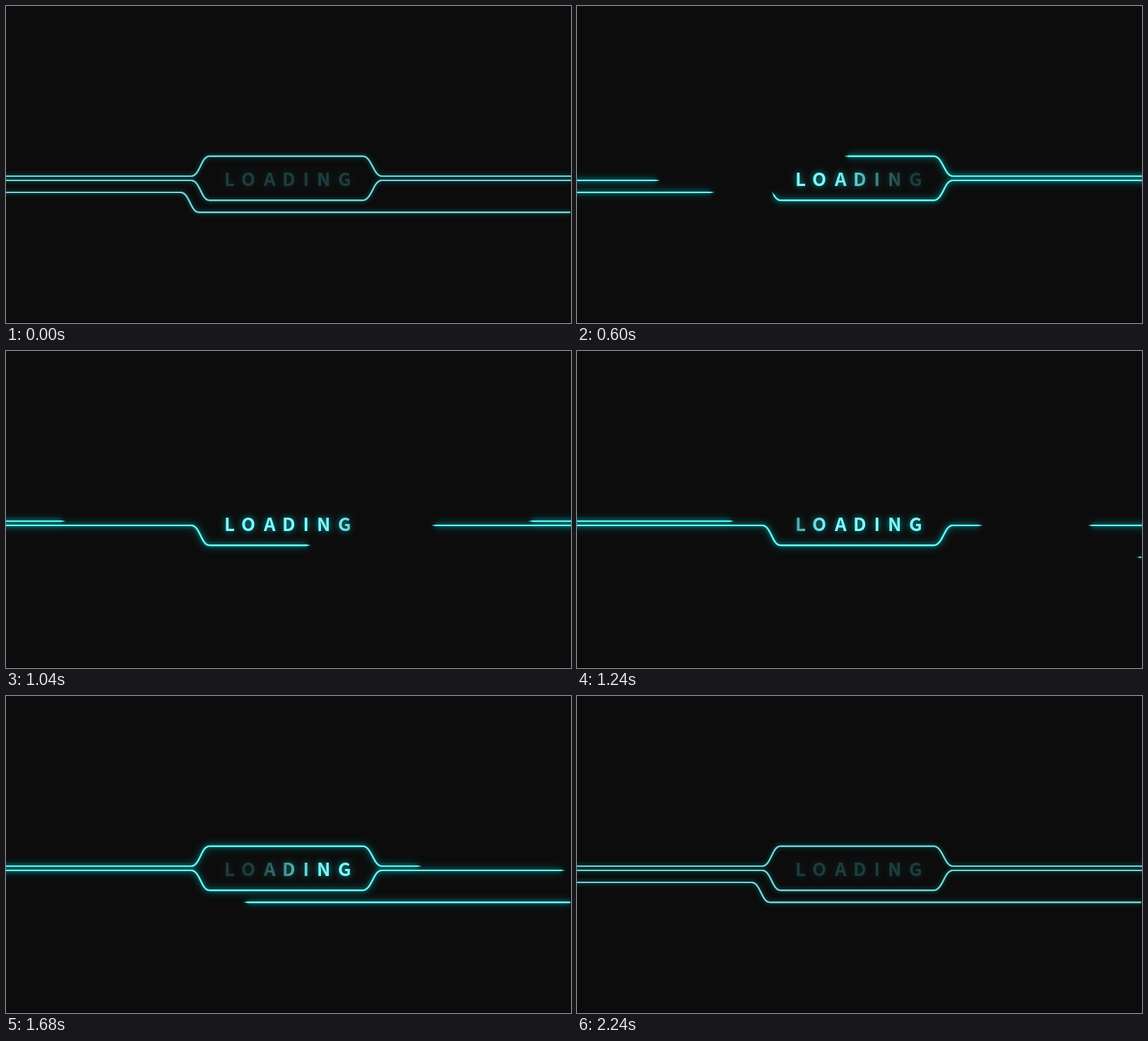
Animation of 800x449 px, one loop 2400 ms. Source, as an HTML page with a canvas:

```html
<!DOCTYPE html>
<html lang="en">
<head>
<meta charset="utf-8">
<title>Loading</title>
<style>
  html, body { margin: 0; height: 100%; overflow: hidden; background: #0c0c0c; }
  canvas { display: block; }
</style>
</head>
<body>
<canvas id="stage" width="800" height="449"></canvas>
<script>
const ctx = document.getElementById('stage').getContext('2d');
const LOOP = 2400, STEP = 40, END = 2240;
const PAD = 20; // how far the wires run on past the stage edges
const FAR = 9999;

const clamp = v => Math.max(0, Math.min(1, v));
const smooth = v => { v = clamp(v); return v * v * (3 - 2 * v); };
const ease = (t, start, length) => smooth((t - start) / length);
const mix = (a, b, k) => a + (b - a) * k;

// Piecewise linear value from [time, value] pairs
function track(keys, t) {
  const i = keys.findIndex(key => key[0] > t);
  if (i < 0) return keys[keys.length - 1][1];
  if (i === 0) return keys[0][1];
  const [t0, v0] = keys[i - 1], [t1, v1] = keys[i];
  return mix(v0, v1, (t - t0) / (t1 - t0));
}

const bend = (x0, y0, x1, y1) =>
  `L${x0} ${y0}C${x0 + 13} ${y0} ${x1 - 12} ${y1} ${x1} ${y1}`;
const hexSide = (outer, inner) => new Path2D(
  `M${-PAD} ${outer}${bend(262, outer, 288, inner)}${bend(505, inner, 532, outer)}L${800 + PAD} ${outer}`);

const LONG = 826, SHORT = 812;
const wires = [
  { path: hexSide(241, 212.7), length: LONG,
    gap: t => [940 * ease(t, 760, 1520), LONG * ease(t, 0, 1240)] },
  { path: hexSide(247, 275.2), length: LONG,
    gap: t => [LONG * ease(t, 240, 1520), LONG * ease(t, 0, 1520)] },
  { path: new Path2D(`M${-PAD} 264${bend(247, 264, 273, 292.2)}L799 292.2`), length: SHORT,
    gap: t => [SHORT * (1 - ease(t, 0, 880)), SHORT * (1 - ease(t, 1200, 880))] }
];

function glow(color, blur) {
  ctx.shadowColor = color;
  ctx.shadowBlur = blur;
}

// Strokes one stretch of a wire; open ends taper to a point
function stretch(path, from, to, openStart, openEnd, power) {
  const layer = (width, inset) => {
    const a = from + PAD + (openStart ? inset : 0);
    const b = to + PAD - (openEnd ? inset : 0);
    if (b <= a) return;
    ctx.lineWidth = width;
    ctx.setLineDash([b - a, FAR]);
    ctx.lineDashOffset = -a;
    ctx.stroke(path);
  };
  glow(`rgba(0,225,230,${mix(0.5, 0.95, power)})`, mix(7, 12, power));
  layer(2, 5);
  glow(`rgba(0,225,230,${mix(0.2, 0.8, power)})`, 5);
  layer(2, 5);
  glow('transparent', 0);
  for (let i = 0; i < 3; i++) layer(0.5 + i * 0.5, i * 2);
}

function drawWire({ path, length, gap }, t, power) {
  const [from, to] = gap(t);
  if (from >= length || to <= 0) {
    stretch(path, -PAD, length + PAD, false, false, power);
    return;
  }
  if (from > 0) stretch(path, -PAD, from, false, true, power);
  if (to < length) stretch(path, to, length + PAD, true, false, power);
}

const letters = [['L', 311], ['O', 334], ['A', 364], ['D', 393], ['I', 422.5], ['N', 442], ['G', 471]];
const lit = [[0, 240], [600, 412], [840, 455], [1240, 560]];
const unlit = [[960, 240], [1240, 310], [1520, 375], [1840, 432], [END, 560]];

function drawWord(t) {
  const on = track(lit, t), off = track(unlit, t);
  const fill = ctx.createLinearGradient(300, 0, 500, 0);
  for (let i = 0; i <= 25; i++) {
    const x = 300 + i * 8;
    const level = smooth((on + 60 - x) / 120) * smooth((x - off + 60) / 120);
    fill.addColorStop(i / 25, `rgba(130,249,251,${mix(0.17, 1, level)})`);
  }
  ctx.font = '700 26px "Noto Sans CJK JP", "Noto Sans CJK SC", "Noto Sans CJK", "Noto Sans", sans-serif';
  ctx.fillStyle = fill;
  glow('rgba(0,220,225,0.8)', 10);
  for (const [letter, left] of letters) {
    ctx.fillText(letter, left + ctx.measureText(letter).actualBoundingBoxLeft, 255);
  }
  glow('transparent', 0);
}

function draw(now) {
  const t = Math.min(END, Math.floor(now % LOOP / STEP) * STEP);
  const power = clamp(1.2 * Math.sin(Math.PI * t / END));
  ctx.fillStyle = '#0c0c0c';
  ctx.fillRect(0, 0, 800, 449);
  ctx.strokeStyle = `rgb(${mix(124, 112, power)},${mix(208, 250, power)},${mix(210, 248, power)})`;
  for (const wire of wires) drawWire(wire, t, power);
  drawWord(t);
  ctx.fillStyle = '#000';
  ctx.fillRect(0, 448, 800, 1);
}

const begin = performance.now();
function tick() {
  draw(performance.now() - begin);
  requestAnimationFrame(tick);
}
tick();
</script>
</body>
</html>
```
